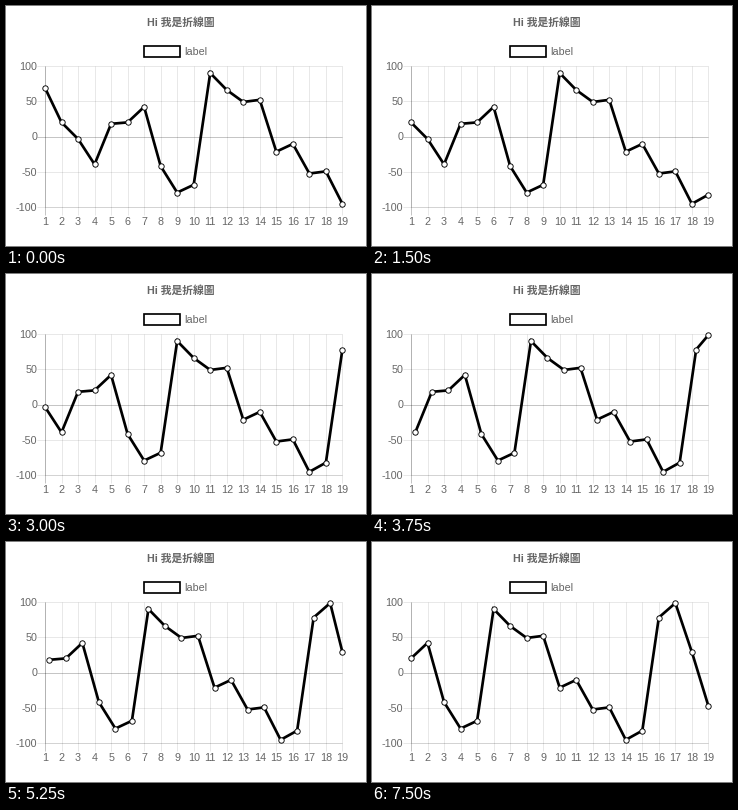
Recreate the animation shown at these times as a matplotlib script. Size 360x240 px, loop 8 s.

```python
import numpy as np
import matplotlib.pyplot as plt
from matplotlib.animation import FuncAnimation
from matplotlib.patches import Rectangle

W, H, DPI = 360, 240, 100
PX = 72 / DPI                      # points per pixel
LEFT, RIGHT, TOP, BOTTOM = 39, 336.4, 60, 201
COUNT = 19
STEP = (RIGHT - LEFT) / (COUNT - 1)
GREY = "#666666"
FONTS = ["Liberation Sans", "Noto Sans CJK JP"]
SIZE = 10.8 * PX
SLIDE_LEFT = 0.26                  # part of a step still to go in mid-slide

VALUES = np.array([69, 20, -3.5, -39.5, 18, 20, 42, -42, -79.5, -68.5, 90, 66,
                   49, 52, -21.5, -10.5, -52.5, -49.5, -95.5, -82.5, 78, 98.5,
                   29, -47.5])


def y_of(value):
    return TOP + (100 - value) * (BOTTOM - TOP) / 200


fig = plt.figure(figsize=(W / DPI, H / DPI), dpi=DPI, facecolor="white")
ax = fig.add_axes([0, 0, 1, 1])
ax.set_xlim(0, W)
ax.set_ylim(H, 0)
ax.axis("off")


def rule(xs, ys, alpha):
    ax.plot(xs, ys, color="black", alpha=alpha, lw=0.9 * PX,
            solid_capstyle="butt", zorder=1)


def label(x, y, text, ha="center", **style):
    ax.text(x, y, text, ha=ha, va="baseline", color=GREY, family=FONTS,
            fontsize=SIZE, **style)


for value in (100, 50, 0, -50, -100):
    y = y_of(value)
    rule([LEFT - 8, RIGHT], [y, y], 0.25 if value == 0 else 0.1)
    label(31, y + 3.8, str(value), ha="right")
for i in range(COUNT):
    x = LEFT + i * STEP
    rule([x, x], [TOP, BOTTOM + 8], 0.25 if i == 0 else 0.1)
    label(x, 219.4, str(i + 1))
rule([LEFT, RIGHT], [BOTTOM, BOTTOM], 0.1)
rule([LEFT, LEFT], [TOP, BOTTOM], 0.1)

label(174.3, 20.2, "Hi 我是折線圖", weight="bold")
ax.add_patch(Rectangle((138, 40.2), 36, 11, facecolor="white",
                       edgecolor="black", lw=1.7 * PX, joinstyle="miter"))
label(178.5, 49.2, "label", ha="left")

line, = ax.plot([], [], color="black", lw=2.7 * PX, solid_joinstyle="miter",
                solid_capstyle="butt", zorder=3)
dots, = ax.plot([], [], "o", ms=5.4 * PX, mfc="white", mec="black",
                mew=0.9 * PX, zorder=4, clip_on=False)


def draw(frame):
    phase = frame // 3             # odd phases are caught in mid-slide
    start = (phase + 1) // 2
    xs = LEFT + np.arange(COUNT) * STEP
    if phase % 2:
        xs[:-1] += SLIDE_LEFT * STEP
    ys = y_of(VALUES[start:start + COUNT])
    line.set_data(xs, ys)
    dots.set_data(xs, ys)
    return line, dots


anim = FuncAnimation(fig, draw, frames=32, interval=250, repeat=True,
                     repeat_delay=0, blit=False)
plt.show()
```
